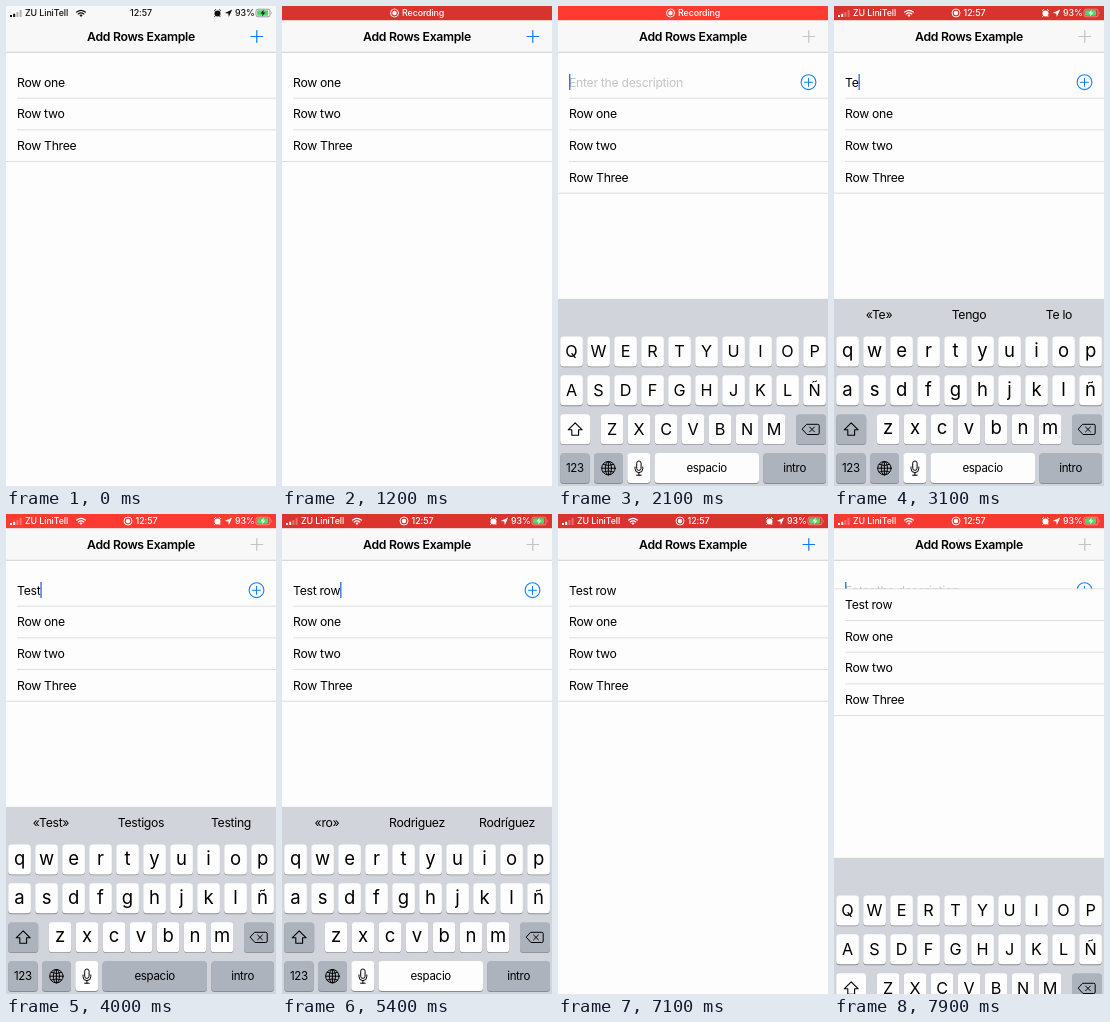
Recreate the animation shown at these times as an HTML page. Size 270 px wide and 480 px high, loop 8000 ms.

```html
<!DOCTYPE html>
<html lang="en">
<head>
<meta charset="utf-8">
<title>Add Rows Example</title>
<style>
  html, body { margin: 0; width: 100%; height: 100%; overflow: hidden; background: #fdfdfe; }
  svg { display: block; width: 100vw; height: 100vh; }
  text { font: 400 12.24px Inter, sans-serif; letter-spacing: -.3px; fill: #000; white-space: pre; }
  .mid { text-anchor: middle; }
  .title { font-weight: 600; }
  .hint { fill: #c4c4c8; }
  .rule { stroke: #d0d0d4; stroke-width: .7; }
  .line { fill: none; stroke-linecap: round; stroke-linejoin: round; }
  .status text, .rec text { font-size: 8.9px; font-weight: 500; letter-spacing: -.1px; fill: currentColor; }
  .rec { color: #fff; }
  .cap { font-size: 16.2px; letter-spacing: 0; }
  .low { font-size: 18.5px; letter-spacing: 0; }
  .word { font-size: 11.5px; }
</style>
</head>
<body>
<svg viewBox="0 0 270 480" preserveAspectRatio="none">
  <defs>
    <g id="dot">
      <circle r="4" fill="none" stroke="currentColor" stroke-width=".9"/>
      <circle r="2.2" fill="currentColor"/>
    </g>
  </defs>
  <rect width="270" height="480" fill="#fdfdfe"/>

  <g id="field">
    <text class="hint" id="hint" x="11" y="80.5">Enter the description</text>
    <text id="typed" x="11" y="80.5"></text>
    <rect id="caret" y="68" width="1.4" height="16" fill="#3f6fe0"/>
    <g class="line" stroke="#1480f5" stroke-width="1.1">
      <circle cx="250.5" cy="76.2" r="7.4"/>
      <path d="M246.5 76.2h8M250.5 72.2v8"/>
    </g>
  </g>
  <g id="list">
    <rect id="cover" width="270" fill="#fdfdfe"/>
    <line class="rule" id="topRule" x2="270"/>
  </g>

  <rect width="270" height="46" fill="#f8f8f9"/>
  <path d="M0 46.3h270" stroke="#c6c6ca" stroke-width=".8"/>
  <text class="mid title" x="135" y="34.8">Add Rows Example</text>
  <path id="add" class="line" d="M245 30.5h11.6M250.8 24.7v11.6" stroke-width="1.2"/>

  <rect id="bar" width="270" height="14.2"/>
  <g class="status" id="status">
    <g fill="currentColor">
      <path d="M4 9h2v2h-2zM7.2 7.7h2v3.3h-2z"/>
      <path opacity=".3" d="M10.4 6h2v5h-2zM13.6 4h2v7h-2z"/>
      <path d="M213.6 10.8l1 -1M209.4 9.8l-1 1" stroke="currentColor"/>
      <circle cx="211.5" cy="7.4" r="3"/>
      <path d="M208.2 4.8l1.7-1.4M214.8 4.8l-1.7-1.4" stroke="currentColor"/>
      <path d="M226.2 3.4l-7.4 3.5 3.5.5.5 3.5z"/>
      <path d="M75 11l-1.7-1.9q1.7-1.2 3.4 0z"/>
    </g>
    <path class="line" stroke="currentColor" stroke-width="1.3" d="M70.7 6.1q4.3-3.6 8.6 0M72.2 7.9q2.8-2.2 5.6 0"/>
    <text x="19" y="10.2">ZU LiniTell</text>
    <text class="mid" id="clock" y="10.2">12:57</text>
    <use id="clockDot" href="#dot" x="122" y="7"/>
    <text x="229" y="10.2">93%</text>
    <rect x="250" y="3.2" width="14" height="7.6" rx="2" fill="none" stroke="currentColor" stroke-opacity=".5" stroke-width=".8"/>
    <rect x="251.1" y="4.3" width="11" height="5.4" rx="1" fill="#52d768"/>
    <path d="M265.2 5.7q1.3 1.3 0 2.6z" fill="currentColor" opacity=".5"/>
    <path d="M257.8 3.6l-3.2 3.9h2.2l-.8 3 3.3-4h-2.2z" fill="currentColor"/>
  </g>
  <g class="rec" id="rec">
    <use href="#dot" x="112.5" y="7"/>
    <text x="120" y="10.2">Recording</text>
  </g>

  <g id="keyboard">
    <rect y="292.8" width="270" height="188" fill="#d1d4da"/>
    <g id="keys"></g>
    <path id="shift" class="line" stroke="#000" stroke-width="1.1" d="M17.2 416.8l7 7h-3.6v5.4h-6.8v-5.4h-3.6z"/>
    <g class="line" stroke="#000" stroke-width="1">
      <path d="M249 418.3h10.8q1.4 0 1.4 1.4v7.4q0 1.4-1.4 1.4h-10.8l-4.6-5.1zM251.6 421l4.8 4.8M256.4 421l-4.8 4.8"/>
      <circle cx="50.4" cy="462.2" r="6.7"/>
      <ellipse cx="50.4" cy="462.2" rx="3.1" ry="6.7"/>
      <path d="M43.7 462.2h13.4M50.4 455.5v13.4M45.2 458.4q5.2 2.4 10.4 0M45.2 466q5.2-2.4 10.4 0"/>
      <path d="M77 461v1.6q0 4 3.9 4t3.9-4v-1.6M80.9 466.6v2.6M78.6 469.2h4.6"/>
    </g>
    <rect x="78.7" y="455" width="4.4" height="9.4" rx="2.2" fill="none" stroke="#000"/>
    <g id="guesses"></g>
  </g>
</svg>
<script>
const LOOP = 8000, ROW = 31.68, TOP = 60.5, KEYBOARD = 187.2;
const OPEN = 1400, SAVE = 6363, REOPEN = 7760;
const WHITE = '#fdfdfd', GREY = '#adb3bd';

// time, field text
const typing = [[0, ''], [2700, 'T'], [3000, 'Te'], [3300, 'Tes'], [3600, 'Test'],
  [4100, 'Test '], [4600, 'Test r'], [5000, 'Test ro'], [5400, 'Test row'], [REOPEN, '']];
// time, keyboard suggestions
const guessing = [[0], [2800, '«T»', 'Te', 'Tu'], [3100, '«Te»', 'Tengo', 'Te lo'],
  [3400, '«Tes»', 'Tesoro', 'Tesis'], [3700, '«Test»', 'Testigos', 'Testing'], [4200],
  [4700, '«r»', 'recto', 'rojo'], [5100, '«ro»', 'Rodriguez', 'Rodríguez'],
  [5500, '«row»', 'rows', ''], [REOPEN]];

const $ = id => document.getElementById(id);
function make(parent, tag, attrs, content = '') {
  const node = document.createElementNS('http://www.w3.org/2000/svg', tag);
  for (const name in attrs) node.setAttribute(name, attrs[name]);
  node.textContent = content;
  return parent.appendChild(node);
}
const set = (id, name, value) => $(id).setAttribute(name, value);
const show = (id, on) => set(id, 'visibility', on ? 'visible' : 'hidden');
const clamp = x => Math.max(0, Math.min(1, x));
const latest = (steps, t) => steps.filter(s => s[0] <= t).pop().slice(1);
const write = (node, value) => { if (node.textContent !== value) node.textContent = value; };

// Critically damped spring for the keyboard, cosine ease for the inserted row
function spring(ms) {
  const x = Math.max(0, ms) * .01826;
  return 1 - Math.exp(-x) * (1 + x);
}
const ease = ms => (1 - Math.cos(Math.PI * clamp(ms / 300))) / 2;

const rows = ['Test row', 'Row one', 'Row two', 'Row Three'].map((name, i) => {
  const y = TOP + (i - 1) * ROW, row = make($('list'), 'g', {});
  make(row, 'text', { x: 11, y: y + 20.2 }, name);
  make(row, 'line', { class: 'rule', x1: i === 3 ? 0 : 11, x2: 270, y1: y + ROW, y2: y + ROW });
  return row;
});

function key(x, line, width, fill = WHITE) {
  const y = 330.4 + line * 38.9;
  make($('keys'), 'rect', { x, y: y + .9, width, height: 30, rx: 3.5, fill: '#888b91' });
  return make($('keys'), 'rect', { x, y, width, height: 30, rx: 3.5, fill });
}
const label = (x, line, name) =>
  make($('keys'), 'text', { class: 'mid word', x, y: 349.5 + line * 38.9 }, name);

const letters = [];
['qwertyuiop', 'asdfghjklñ', 'zxcvbnm'].forEach((chars, line) => {
  [...chars].forEach((char, i) => {
    const x = 2.2 + 27 * i + (line === 2 ? 40.5 : 0);
    key(x, line, 22.7);
    const node = make($('keys'), 'text', { x: x + 11.35 }, char);
    letters.push({ node, char, line });
  });
});
const shiftKey = key(2.2, 2, 30, GREY);
key(238, 2, 30, GREY);
key(2.2, 3, 29.5, GREY);
key(36, 3, 29, GREY);
key(69.3, 3, 23);
const spaceKey = key(96.5, 3, 104.5);
key(205.2, 3, 62.8, GREY);
label(16.9, 3, '123');
label(148.7, 3, 'espacio');
label(236.6, 3, 'intro');
const guesses = [45, 135, 225].map(x => make($('guesses'), 'text', { class: 'mid', x, y: 313.3 }));

let wasUpper;
function setCase(upper) {
  if (upper === wasUpper) return;
  wasUpper = upper;
  for (const { node, char, line } of letters) {
    node.textContent = upper ? char.toUpperCase() : char;
    node.setAttribute('class', upper ? 'mid cap' : 'mid low');
    node.setAttribute('y', (upper ? 351.3 : 350.6) + line * 38.9);
  }
  shiftKey.setAttribute('fill', upper ? WHITE : GREY);
  set('shift', 'fill', upper ? '#000' : 'none');
}

function drawStatus(t) {
  const bright = (1 - Math.cos(2 * Math.PI * (t - 1200) / 2000)) / 2;
  const mix = (a, b) => Math.round(a + (b - a) * bright);
  const recording = t >= 300 && t < 3000;
  set('bar', 'fill', `rgb(${mix(215, 255)},${mix(51, 59)},${mix(47, 49)})`);
  set('bar', 'opacity', clamp((t - 200) / 200));
  show('status', !recording);
  show('rec', recording);
  set('status', 'color', t < 300 ? '#111' : '#fff');
  set('clock', 'x', t < 300 ? 135 : 140.5);
  set('clockDot', 'opacity', t < 300 ? 0 : 1);
}

function drawList(t, editing) {
  const saved = t >= SAVE;
  const inserted = ease(t - (saved ? REOPEN : OPEN));
  const first = TOP - (saved ? ROW : 0);
  set('list', 'transform', `translate(0 ${ROW * (inserted + (saved ? 1 : 0))})`);
  rows[0].setAttribute('visibility', saved ? 'visible' : 'hidden');
  set('cover', 'y', first);
  set('cover', 'height', ROW * (saved ? 4 : 3));
  show('topRule', editing);
  set('topRule', 'x1', inserted < 1 ? 0 : 11);
  set('topRule', 'y1', first);
  set('topRule', 'y2', first);
  show('field', editing);
  set('add', 'stroke', editing ? '#c3c3c7' : '#0a7aff');
}

function drawTyping(t) {
  const [value] = latest(typing, t);
  write($('typed'), value);
  set('hint', 'opacity', value ? 0 : 1);
  set('caret', 'x', 11 + (value ? $('typed').getComputedTextLength() : 0));
  setCase(!value);
  spaceKey.setAttribute('fill', t >= 4000 && t < 4100 ? GREY : WHITE);
  const words = latest(guessing, t);
  guesses.forEach((node, i) => write(node, words[i] || ''));
}

function draw(t) {
  const editing = t >= OPEN && t < SAVE || t >= REOPEN;
  const raised = spring(t - OPEN) - spring(t - SAVE) + spring(t - REOPEN);
  drawStatus(t);
  drawList(t, editing);
  drawTyping(t);
  set('keyboard', 'transform', `translate(0 ${KEYBOARD * (1 - raised)})`);
}

const start = performance.now();
function tick() {
  draw((performance.now() - start) % LOOP);
  requestAnimationFrame(tick);
}
tick();
</script>
</body>
</html>
```
